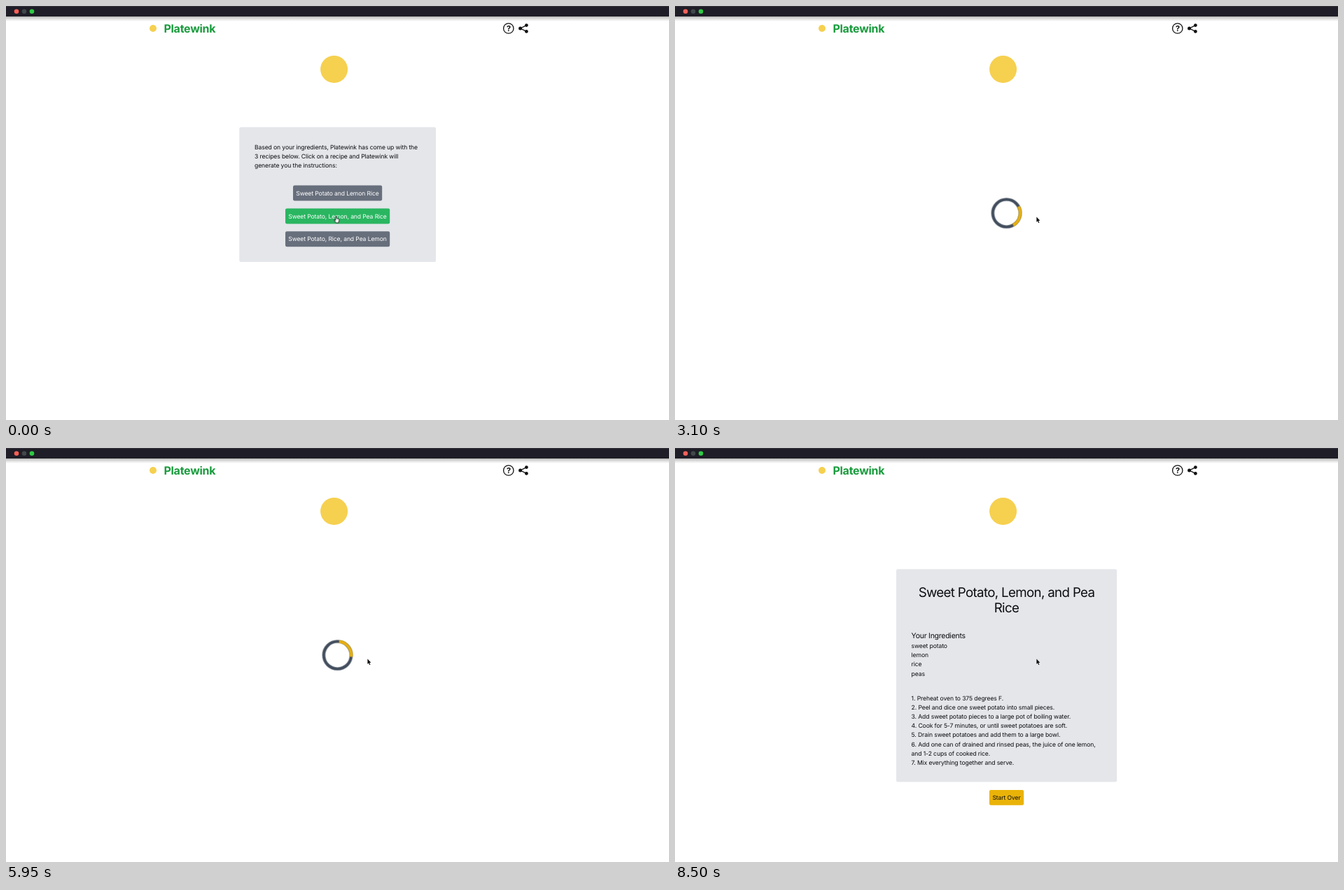
Write an HTML page that moves like this. It is 947 by 592 pixels and loops after 9.15 s.

```html
<!DOCTYPE html>
<html lang="en">
<head>
<meta charset="utf-8">
<title>Recipe picker</title>
<style>
  html, body { margin: 0; width: 100%; height: 100%; overflow: hidden; background: #fff; }
  svg { display: block; width: 947px; height: 592px; }
  text { font: 8.6px Inter, "Noto Sans", sans-serif; letter-spacing: -.11px; fill: #0c0d0f; text-rendering: geometricPrecision; }
  .brand { font-size: 16px; font-weight: 700; letter-spacing: -.25px; fill: #189b3c; }
  .title { font-size: 18.8px; letter-spacing: -.7px; }
  .sub { font-size: 10.5px; letter-spacing: -.25px; }
  .help { font-size: 11px; font-weight: 700; }
  .mid { text-anchor: middle; }
  .light { fill: #fff; }
  .card { fill: #e4e6ea; }
  .grey { fill: #686f7c; }
  .green { fill: #2ab661; }
  .amber { fill: #eab308; }

  /* One loop: choices until 900 ms, loading until 7450 ms, then the recipe */
  #choices, #loading, #recipe, #arrow { animation: 9150ms step-end infinite; }
  #choices { animation-name: choices; }
  #loading { animation-name: loading; }
  #recipe { animation-name: recipe; }
  #arrow { animation-name: arrow; }
  #hand { animation: glide 9150ms infinite; }
  #arc { animation: spin 9150ms steps(183) infinite; }

  @keyframes choices { 0% { opacity: 1 } 9.836%, 100% { opacity: 0 } }
  @keyframes loading { 0% { opacity: 0 } 9.836% { opacity: 1 } 81.42%, 100% { opacity: 0 } }
  @keyframes recipe { 0% { opacity: 0 } 81.42%, 100% { opacity: 1 } }
  @keyframes arrow { 0% { opacity: 0 } 9.836%, 100% { opacity: 1 } }
  @keyframes glide {
    0%, .4% { transform: translate(471.6px, 300.6px); animation-timing-function: ease-in-out; }
    6.557%, 100% { transform: translate(516.4px, 301.2px); }
  }
  /* One turn per second */
  @keyframes spin { from { transform: rotate(70deg) } to { transform: rotate(3364deg) } }
</style>
</head>
<body>
<svg viewBox="0 0 947 592">
  <defs>
    <linearGradient id="shade" x2="0" y2="1">
      <stop offset="0" stop-color="#000" stop-opacity=".28"/>
      <stop offset=".5" stop-color="#000" stop-opacity=".12"/>
      <stop offset="1" stop-color="#000" stop-opacity="0"/>
    </linearGradient>
  </defs>

  <rect y="15" width="947" height="7" fill="url(#shade)"/>
  <rect width="947" height="15" fill="#1f1d27"/>
  <rect width="947" height="1" fill="#34333a"/>
  <circle cx="15" cy="7.8" r="3.3" fill="#fb6058"/>
  <circle cx="26" cy="7.8" r="3.3" fill="#41484a"/>
  <circle cx="37" cy="7.8" r="3.3" fill="#2fc944"/>

  <circle cx="210" cy="32" r="5" fill="#f6d04f"/>
  <text class="brand" x="225.4" y="38">Platewink</text>
  <circle cx="468.6" cy="90.5" r="19.5" fill="#f6d04f"/>

  <circle cx="717.8" cy="32" r="7.2" fill="none" stroke="#111" stroke-width="1.3"/>
  <text class="mid help" x="717.9" y="36">?</text>
  <path d="M743.4 27.6L734.6 32L743.4 36.4" fill="none" stroke="#111" stroke-width="1.3"/>
  <g fill="#111">
    <circle cx="734.6" cy="32" r="2.5"/>
    <circle cx="743.4" cy="27.6" r="2.4"/>
    <circle cx="743.4" cy="36.4" r="2.4"/>
  </g>

  <g id="choices">
    <rect class="card" x="333.3" y="173.3" width="280.8" height="192.6" rx="2.2"/>
    <text x="355" y="204.9">Based on your ingredients, Platewink has come up with the</text>
    <text x="355" y="218.1">3 recipes below. Click on a recipe and Platewink will</text>
    <text x="355" y="231.3">generate you the instructions:</text>
    <rect class="grey" x="410" y="256.5" width="127.2" height="22" rx="2.2"/>
    <rect class="green" x="399" y="289.4" width="149.2" height="22" rx="2.2"/>
    <rect class="grey" x="399" y="322.3" width="149.2" height="22" rx="2.2"/>
    <text class="mid light" x="473.5" y="270.6">Sweet Potato and Lemon Rice</text>
    <text class="mid light" x="473.5" y="303.5">Sweet Potato, Lemon, and Pea Rice</text>
    <text class="mid light" x="473.5" y="336.4">Sweet Potato, Rice, and Pea Lemon</text>
    <g id="hand">
      <path d="M-.9 .6Q0-.5 .8 .6V3.2L3.6 3.9Q4.5 4.2 4.3 5.2L3.5 9.4H-.4L-2.6 6Q-2.9 4.9-1.8 5.1L-.9 5.9Z"
        fill="#fff" stroke="#111" stroke-width=".9" stroke-linejoin="round"/>
    </g>
  </g>

  <g id="loading">
    <g transform="translate(473.5 296.2)" fill="none" stroke-width="4.4">
      <circle r="19.6" stroke="#424d5d"/>
      <path id="arc" d="M-13.86-13.86A19.6 19.6 0 0 1 13.86-13.86" stroke="#e6b012"/>
    </g>
  </g>

  <g id="recipe">
    <rect class="card" x="316" y="173.3" width="315.2" height="304.2" rx="2.2"/>
    <text class="title mid" x="473.5" y="213.4">Sweet Potato, Lemon, and Pea</text>
    <text class="title mid" x="473.5" y="235.4">Rice</text>
    <text class="sub" x="337.6" y="272.4">Your Ingredients</text>
    <g id="ingredients"></g>
    <g id="steps"></g>
    <rect class="amber" x="449" y="489" width="49.2" height="21.8" rx="2.2"/>
    <text class="mid" x="473.5" y="503">Start Over</text>
  </g>

  <path id="arrow" d="M516.4 301.4V309.1L518.1 307.5L519.2 310.2L520.4 309.7L519.3 307.1H521.4Z"
    fill="#111" stroke="#fff" stroke-width=".6" paint-order="stroke"/>
</svg>
<script>
  const LINE = 13.2;

  function addLines(id, top, lines) {
    const group = document.getElementById(id);
    lines.forEach((line, i) => {
      const text = document.createElementNS("http://www.w3.org/2000/svg", "text");
      text.setAttribute("x", 337.6);
      text.setAttribute("y", top + i * LINE);
      text.textContent = line;
      group.append(text);
    });
  }

  addLines("ingredients", 286, ["sweet potato", "lemon", "rice", "peas"]);
  addLines("steps", 360.6, [
    "1. Preheat oven to 375 degrees F.",
    "2. Peel and dice one sweet potato into small pieces.",
    "3. Add sweet potato pieces to a large pot of boiling water.",
    "4. Cook for 5-7 minutes, or until sweet potatoes are soft.",
    "5. Drain sweet potatoes and add them to a large bowl.",
    "6. Add one can of drained and rinsed peas, the juice of one lemon,",
    "and 1-2 cups of cooked rice.",
    "7. Mix everything together and serve."
  ]);
</script>
</body>
</html>
```
